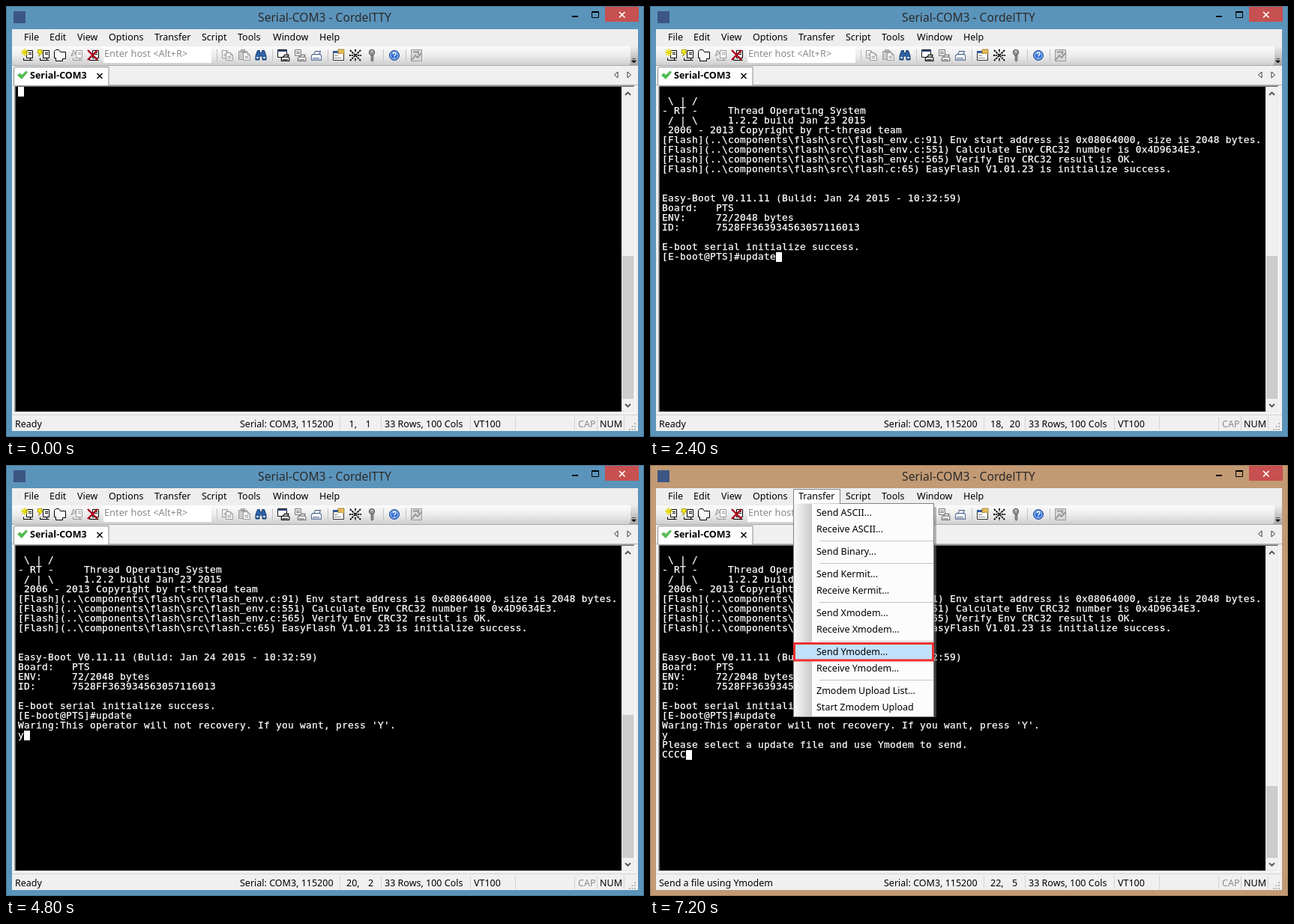
An HTML page that plays this animation: 851 px wide and 576 px high, repeating every 8 s.

```html
<!DOCTYPE html>
<html lang="en">
<head>
<meta charset="utf-8">
<title>Serial terminal</title>
<style>
html, body { margin: 0; width: 100%; height: 100%; overflow: hidden; background: #5b94bb; }
svg { display: block; width: 851px; height: 576px; }
text { font: 12.5px "Noto Sans", "Open Sans", sans-serif; fill: #000; white-space: pre; }
.title { font-size: 15.6px; fill: #2b2b2b; text-anchor: middle; }
.tab { font-weight: bold; }
.hint { font-size: 12.8px; fill: #8a8a8a; }
.off { fill: #8c8c8c; }
.term { font: 12.8px "DejaVu Sans Mono", monospace; letter-spacing: .294px; fill: #fff; stroke: #fff; stroke-width: .25px; }
.line { fill: none; stroke: #000; }

/* Hard cuts every 1.2 s within an 8 s loop */
.from1, .from2, .from3, .from4, .from5, .from6, .until5, .only, #cursor, #frame, #edge, #thumb {
  animation: 8s step-end infinite;
}
.from1 { animation-name: from1; }
.from2 { animation-name: from2; }
.from3 { animation-name: from3; }
.from4 { animation-name: from4; }
.from5 { animation-name: from5; }
.from6 { animation-name: from6; }
.until5 { animation-name: until5; }
.only { animation-name: only; animation-delay: calc(var(--i) * 1.2s - 8s); }
#cursor { animation-name: cursor; }
#frame { animation-name: frame; }
#edge { animation-name: edge; }
#thumb { animation-name: thumb; }
@keyframes from1 { 0% { visibility: hidden } 15%, 100% { visibility: visible } }
@keyframes from2 { 0% { visibility: hidden } 30%, 100% { visibility: visible } }
@keyframes from3 { 0% { visibility: hidden } 45%, 100% { visibility: visible } }
@keyframes from4 { 0% { visibility: hidden } 60%, 100% { visibility: visible } }
@keyframes from5 { 0% { visibility: hidden } 75%, 100% { visibility: visible } }
@keyframes from6 { 0% { visibility: hidden } 90%, 100% { visibility: visible } }
@keyframes until5 { 0% { visibility: visible } 75%, 100% { visibility: hidden } }
@keyframes only { 0% { visibility: visible } 15%, 100% { visibility: hidden } }
@keyframes cursor {
  0% { transform: translate(0, 0) }
  15% { transform: translate(104px, 221px) }
  30% { transform: translate(152px, 221px) }
  45% { transform: translate(0, 247px) }
  60% { transform: translate(8px, 247px) }
  75% { transform: translate(8px, 273px) }
  90%, 100% { transform: translate(32px, 273px) }
}
@keyframes frame { 0% { fill: #5b94bb } 90%, 100% { fill: #c29a74 } }
@keyframes edge { 0% { stroke: #477695 } 90%, 100% { stroke: #9a7a5b } }
@keyframes thumb {
  0% { transform: translateY(0); height: 191px }
  90%, 100% { transform: translateY(95px); height: 96px }
}
</style>
</head>
<body>
<svg viewBox="0 0 851 576">
  <defs>
    <linearGradient id="bar" x2="0" y2="1">
      <stop stop-color="#fbfbfb"/><stop offset=".5" stop-color="#ececec"/><stop offset="1" stop-color="#cfcfcf"/>
    </linearGradient>
    <linearGradient id="more" x2="0" y2="1">
      <stop stop-color="#ededed"/><stop offset="1" stop-color="#a6a6a6"/>
    </linearGradient>
    <linearGradient id="gutter">
      <stop stop-color="#f8f8f8"/><stop offset="1" stop-color="#c9c9c9"/>
    </linearGradient>
    <g id="plug" fill="#fff">
      <path d="M7.5 1.5h8v10h-8z"/>
      <path d="M10 4.5h4M10 6.5h4M12.5 12v2.5h-9v-3M3.5 14.5h12" fill="none"/>
    </g>
    <g id="page" fill="#f4f4f4">
      <path d="M.5 .5h6l3 3v7h-9z"/><path d="M6.5 .5v3h3M2.5 5.5h5M2.5 7.5h5" fill="none"/>
    </g>
    <g id="printer" fill="#fff">
      <path d="M3.5 4.5l2-4h7l-2 4z"/><path d="M.5 5.5l2-1.5h10l1 1.5v5h-13z"/><path d="M2 8.5h9" fill="none"/>
    </g>
  </defs>

  <!-- Window frame -->
  <rect id="frame" width="851" height="576" fill="#5b94bb"/>
  <rect id="edge" class="line" x=".5" y=".5" width="850" height="575"/>
  <rect x="10" y="7" width="16" height="16" fill="#3c5684"/>
  <path class="line" d="M755 14h8" stroke-width="2"/>
  <path class="line" d="M781.5 7.5h9v8h-9zM781 8.5h10"/>
  <rect x="799" y="1" width="45" height="20" fill="#c75050"/>
  <path class="line" d="M818 8l7.500 7.500M825.500 8l-7.500 7.500" style="stroke:#fff" stroke-width="1.700"/>

  <!-- Menu, toolbar and tabs -->
  <rect x="8" y="31" width="835" height="537" fill="#f0f0f0"/>
  <rect x="8" y="31" width="835" height="23" fill="#eee"/>
  <rect x="8" y="54" width="835" height="25" fill="url(#bar)"/>
  <path d="M833 54h10v25h-12q2-2 2-5z" fill="url(#more)"/>
  <path d="M835 70.500h5M834.500 73h6l-3 3z" fill="#000" stroke="#000" stroke-width=".6"/>
  <path class="line" d="M8 79.500h835" style="stroke:#a9a9a9"/>
  <rect x="130" y="54" width="144" height="22" fill="#fff"/>
  <path class="line" d="M281.500 58v16M355.500 58v16M429.500 58v16M503.500 58v16M533.500 58v16" style="stroke:#c3c3c3"/>

  <!-- Session icons -->
  <g stroke="#000">
    <use href="#plug" x="20" y="58"/>
    <path d="M20 62h10M25 57v10M21.500 58.500l7 7M28.500 58.500l-7 7" stroke="#e6d800" stroke-width="1.400"/>
    <use href="#plug" x="42" y="58"/>
    <path d="M42.500 58.500h6l-2 3h3l-6 6 1.500-4.500h-3z" fill="#ffef00" stroke="#8a8000" stroke-width=".7"/>
    <path d="M64.500 60.500l2-2h4l2 3h7v9h-4v3h-9v-4h-2z" fill="#f8f8f8"/>
    <use href="#plug" x="108" y="58"/>
    <path d="M109 59l13 13M122 59l-13 13" stroke="#b00018" stroke-width="2.400"/>
  </g>
  <g stroke="#999">
    <use href="#plug" x="86" y="58"/>
    <path d="M87 67l3-8 3 4z" fill="#ddd"/>
    <use href="#page" x="288" y="59"/><use href="#page" x="293" y="62"/>
    <path d="M310.500 60.500h11v11h-11zM313.500 58.500h5v3h-5z" fill="#ccc"/><use href="#page" x="316" y="62"/>
  </g>
  <!-- Binoculars -->
  <path d="M335.500 59.500h3v3h3v-3h3l2.500 7v5.500h-5v-5h-4v5h-5v-5.500z" fill="#2f62a8" stroke="#183a6b"/>
  <path d="M334 69h3M343 69h3" stroke="#cfe2ff" stroke-width="2"/>
  <!-- Printing -->
  <g stroke="#111">
    <path d="M362.500 58.500h12v10h-12z" fill="#fff"/><path d="M362 60h13" stroke="#334a80" stroke-width="2"/>
    <use href="#printer" transform="translate(367 65) scale(.8)" stroke-width="1.500"/>
  </g>
  <g stroke="#777">
    <path d="M385.500 58.500h8v8h-8z" fill="#eee"/><path d="M387 61.500h5M387 63.500h5"/>
    <use href="#printer" transform="translate(389 65) scale(.8)" stroke-width="1.500"/>
  </g>
  <use href="#printer" transform="translate(407 60) scale(1 1.150)" stroke="#4c648c"/>
  <!-- Options, keymap, key -->
  <path d="M436.500 60.500h14v12h-14z" fill="#fff" stroke="#333"/>
  <path d="M436 61.500h14" stroke="#30589c" stroke-width="3"/>
  <path d="M443 58h8v7l-3-2-5 1z" fill="#e6bd55" stroke="#8a6a20" stroke-width=".7"/>
  <path d="M438 66.500h5M438 69.500h9" stroke="#888"/>
  <path class="line" d="M459 59l14 14M473 59l-14 14M458 66h5M469 66h5M466 58v4M466 70v4" stroke-width="1.800" stroke-dasharray="2.500 1"/>
  <path d="M487 65h3v8l-1.500 1.500-1.500-1.500z" fill="#888" stroke="#555" stroke-width=".6"/>
  <circle cx="488" cy="62" r="3.700" fill="#999" stroke="#555"/><circle cx="488" cy="60.500" r="1" fill="#eee"/>
  <!-- Help -->
  <rect class="only" style="--i:5" x="507.500" y="55.500" width="21" height="21" fill="#c4e0fa" stroke="#3399ff"/>
  <circle cx="518" cy="66" r="6.500" fill="#2f6fd0" stroke="#1d4c9c"/>
  <circle cx="518" cy="66" r="5" fill="none" stroke="#dbe9ff" stroke-width=".8"/>
  <path d="M516 64.500q0-2 2-2t2 1.800q0 1-2 2.200v1M518 68.700v1.300" fill="none" stroke="#fff" stroke-width="1.300"/>
  <path d="M540.500 58.500h14v15h-14z" fill="#d8d8d8" stroke="#999"/>
  <path d="M541 72l5-6 3 3 5-6M543 61.500h6M550 60v5" fill="none" stroke="#888" stroke-width="1.500"/>

  <!-- Tab -->
  <path class="line" d="M8 105.500h835" style="stroke:#b4b4b4"/>
  <path d="M10.500 106v-22q0-2.500 2.500-2.500h124v24.500" fill="#fff" stroke="#8d8d8d"/>
  <path d="M15.500 92.500l3-2.500 2.500 2.500 6-5.500 1.500 1.500-7.500 9z" fill="#4fc04a" stroke="#2f9b31" stroke-width=".6"/>
  <path class="line" d="M121.500 90l7 7M128.500 90l-7 7" stroke-width="1.500"/>
  <path d="M816 88v8l-4.500-4zM829 88v8l4.500-4z" fill="#fff" stroke="#333"/>

  <!-- Terminal and scroll bar -->
  <path class="line" d="M11 543.500h827.500v-437" style="stroke:#fff"/>
  <path class="line" d="M12 542.500h825.500v-435" style="stroke:#e3e3e3"/>
  <path class="line" d="M11.500 543v-436.500h827" style="stroke:#a0a0a0"/>
  <path class="line" d="M12.500 542v-434.500h825" style="stroke:#696969"/>
  <rect x="13" y="108" width="808" height="434" fill="#000"/>
  <rect x="821" y="108" width="16" height="434" fill="#f0f0f0"/>
  <rect id="thumb" x="822" y="334" width="15" height="191" fill="#cdcdcd"/>
  <path class="line" d="M826 119l3.500-3.500 3.500 3.500M826 532l3.500 3.500 3.500-3.500" style="stroke:#505050" stroke-width="1.800"/>
  <g id="screen"></g>
  <rect id="cursor" x="16" y="108" width="8" height="13" fill="#fff"/>

  <!-- Status bar -->
  <path class="line" d="M8 546.500h835" style="stroke:#d5d5d5"/>
  <path class="line" d="M445.500 549v18M500.500 549v18M619.500 549v18M679.500 549v18M758.500 549v18M788.500 549v18M824.500 549v18" style="stroke:#d4d4d4"/>
  <path class="line" d="M838 558h2M834.500 562h2M838 562h2M831 566h2M834.500 566h2M838 566h2" style="stroke:#b5b5b5" stroke-width="2"/>
  <g id="labels"></g>

  <!-- Open menu -->
  <g class="from6">
    <path d="M195 337h187V56h-3v281z" fill="#777" opacity=".5"/>
    <rect x="191.500" y="51.500" width="187" height="285" fill="#fcfcfc" stroke="#808080"/>
    <rect x="192" y="52" width="24" height="284" fill="url(#gutter)"/>
    <path d="M191.500 52v-19.500h62v19" fill="#fcfcfc" stroke="#808080"/>
    <path class="line" d="M226 101.500h152M226 131.500h152M226 183.500h152M226 235.500h152M226 287.500h152" style="stroke:#c6c6c6"/>
    <rect x="193" y="239" width="185" height="22" fill="#c2e1fb"/>
    <rect class="line" x="192.500" y="238.500" width="185" height="22.500" style="stroke:#ee3030" stroke-width="3"/>
    <g id="menu"></g>
  </g>
</svg>
<script>
const $ = id => document.getElementById(id);

function put(group, x, y, str, cls = "", slot) {
  const t = document.createElementNS("http://www.w3.org/2000/svg", "text");
  t.setAttribute("x", x);
  t.setAttribute("y", y);
  t.setAttribute("class", cls);
  if (slot !== undefined) t.style.setProperty("--i", slot);
  t.textContent = str;
  $(group).append(t);
}

const type = (row, col, str, step) =>
  put("screen", 16 + col * 8, 118 + row * 13, str, "term from" + step);

String.raw`
 \ | /
- RT -     Thread Operating System
 / | \     1.2.2 build Jan 23 2015
 2006 - 2013 Copyright by rt-thread team
[Flash](..\components\flash\src\flash_env.c:91) Env start address is 0x08064000, size is 2048 bytes.
[Flash](..\components\flash\src\flash_env.c:551) Calculate Env CRC32 number is 0x4D9634E3.
[Flash](..\components\flash\src\flash_env.c:565) Verify Env CRC32 result is OK.
[Flash](..\components\flash\src\flash.c:65) EasyFlash V1.01.23 is initialize success.


Easy-Boot V0.11.11 (Bulid: Jan 24 2015 - 10:32:59)
Board:   PTS
ENV:     72/2048 bytes
ID:      7528FF363934563057116013

E-boot serial initialize success.
[E-boot@PTS]#`.split("\n").forEach((str, row) => str && type(row, 0, str, 1));
type(17, 13, "update", 2);
type(18, 0, "Waring:This operator will not recovery. If you want, press 'Y'.", 3);
type(19, 0, "y", 4);
type(20, 0, "Please select a update file and use Ymodem to send.", 5);
type(21, 0, "C", 5);
type(21, 1, "CCC", 6);

const label = (x, y, str, cls, slot) => put("labels", x, y, str, cls, slot);
label(425, 21, "Serial-COM3 - CordelTTY", "title");
[["File", 24], ["Edit", 58], ["View", 95], ["Options", 137], ["Transfer", 198],
 ["Script", 261], ["Tools", 309], ["Window", 356], ["Help", 418]].forEach(([s, x]) => label(x, 46, s));
label(131, 68, "Enter host <Alt+R>", "hint");
label(32, 97, "Serial-COM3", "tab");

label(12, 563, "Ready", "until5");
label(12, 563, "Display help topics", "only", 5);
label(12, 563, "Send a file using Ymodem", "from6");
label(312, 563, "Serial: COM3, 115200");
label(505, 563, "33 Rows, 100 Cols");
label(624, 563, "VT100");
label(763, 563, "CAP", "off");
label(792, 563, "NUM");

// Cursor position readout: row, column
[[1, 1], [18, 14], [18, 20], [20, 1], [20, 2], [22, 2], [22, 5]].forEach(([row, col], i) => {
  const cls = i < 6 ? "only" : "from6";
  label(row < 10 ? 457.5 : 454, 563, row + ",", cls, i);
  label(i && col < 10 ? 483 : 479.5, 563, col, cls, i);
});

put("menu", 198, 46, "Transfer");
[["Send ASCII...", 68], ["Receive ASCII...", 90], ["Send Binary...", 120],
 ["Send Kermit...", 150], ["Receive Kermit...", 172], ["Send Xmodem...", 202],
 ["Receive Xmodem...", 224], ["Send Ymodem...", 254], ["Receive Ymodem...", 276],
 ["Zmodem Upload List...", 306], ["Start Zmodem Upload", 328]].forEach(([s, y]) => put("menu", 222, y, s));
</script>
</body>
</html>
```
